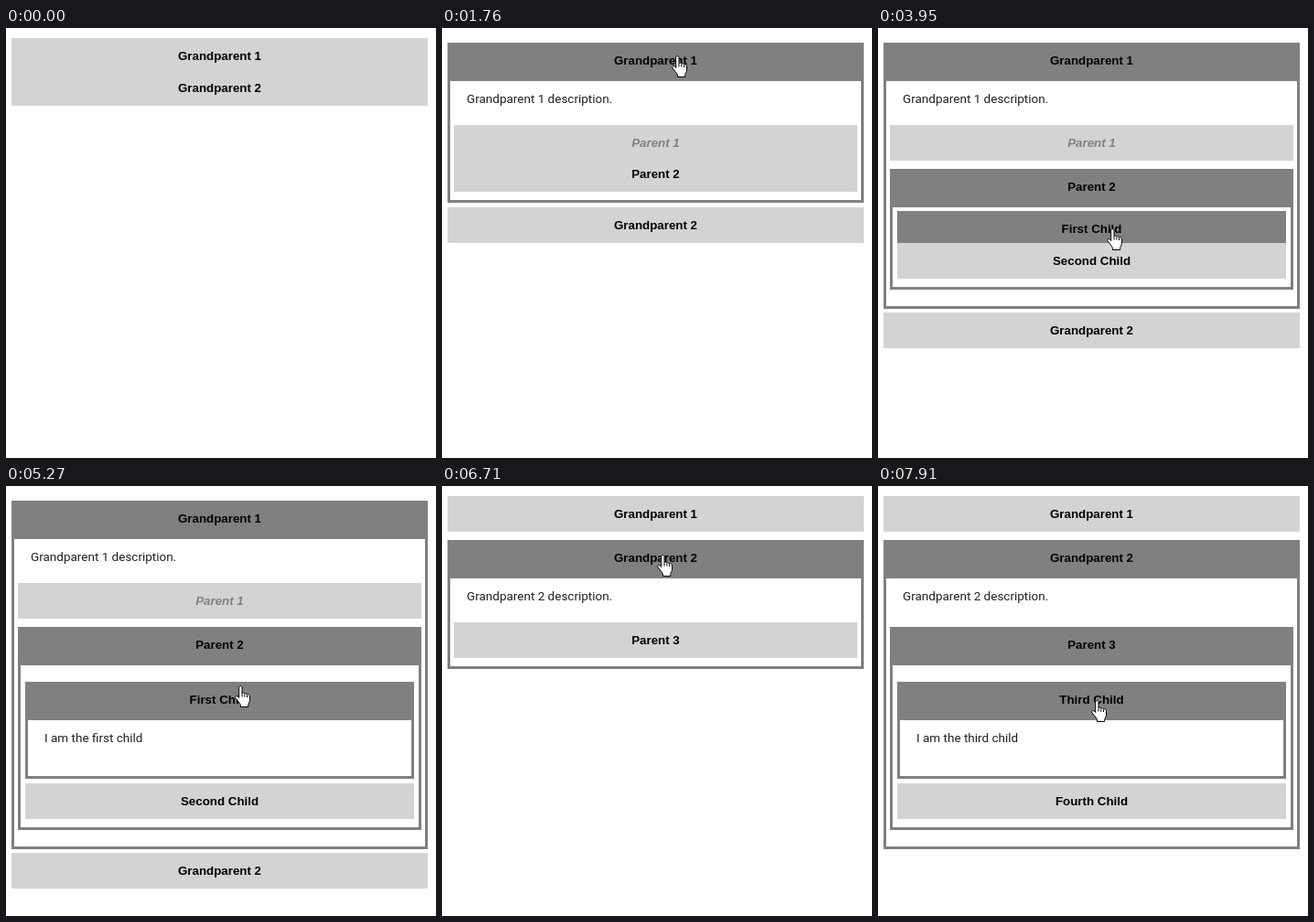
Recreate the animation shown at these times as an HTML page. Size 470 by 470 pixels, loop 8000 ms.

```html
<!DOCTYPE html>
<html lang="en">
<head>
<meta charset="utf-8">
<title>Nested accordion</title>
<style>
  html, body { margin: 0; width: 100%; height: 100%; overflow: hidden; background: #fff; }
  #stage { position: relative; width: 470px; height: 470px; overflow: hidden; }
  #stage div { position: absolute; box-sizing: border-box; }
  .bar {
    height: 39px; background: #d3d3d3; color: #000; text-align: center;
    font: bold 13.333px/39px "Liberation Sans", Arial, sans-serif;
  }
  .bar.dark { background: #808080; }
  .bar.off { color: #808080; font-style: italic; }
  .bar.ring { outline: 2px solid #101010; outline-offset: -1px; }
  .panel { border: 3px solid #808080; background: #fff; }
  .note { color: #212121; font: 13.5px/20px Roboto, sans-serif; white-space: nowrap; }
  svg { position: absolute; left: 0; top: 0; overflow: visible; fill: #fff; stroke: #000; stroke-linejoin: round; }
</style>
</head>
<body>
<div id="stage">
  <div id="view"></div>
  <svg id="arrow" width="13" height="20"><path d="M.5.5v16l3.7-3.5 2.6 5.8 2.4-1-2.5-5.6h5Z"/></svg>
  <svg id="hand" width="17" height="24">
    <path d="M6.3.6c1 0 1.7.7 1.7 1.6v6.3c.4-.7 2.4-.7 2.8.6.7-.6 2.5-.3 2.7.9 1-.5 3 0 3 1.8v4.4c0 2.500-1.800 3.600-1.800 5.300v2H6.500v-1.800C6.500 19.900 1.200 14.800.7 13.300c-.4-1.600 1.500-2.500 3-.9l1 1.100V2.200C4.700 1.300 5.300.6 6.300.6Z"/>
    <path fill="none" d="M8 8.500v4M10.800 9.500v3.200M13.500 10.500v2.500"/>
  </svg>
</div>
<script>
const LOOP = 8000;
const view = document.getElementById('view');
const cursors = { arrow: document.getElementById('arrow'), hand: document.getElementById('hand') };

// Left edge and width of each nesting level
const LEVELS = [[6, 455], [13, 441], [21, 425]];
const G1 = 'Grandparent 1', G2 = 'Grandparent 2';
const P1 = 'Parent 1', P2 = 'Parent 2', P3 = 'Parent 3';
const C1 = 'First Child', C2 = 'Second Child', C3 = 'Third Child', C4 = 'Fourth Child';
const NOTES = {
  [G1]: 'Grandparent 1 description.',
  [G2]: 'Grandparent 2 description.',
  [C1]: 'I am the first child',
  [C3]: 'I am the third child'
};

// Each item: name, level, top, bottom of its panel when open
const SCENES = {
  closed: [[G1, 0, 11], [G2, 0, 46]],
  g1: [[G1, 0, 16, 191], [P1, 1, 106], [P2, 1, 140], [G2, 0, 196]],
  p2: [[G1, 0, 16, 307], [P1, 1, 106], [P2, 1, 154, 286], [C1, 2, 200], [C2, 2, 235], [G2, 0, 311]],
  c1: [[G1, 0, 16, 397], [P1, 1, 106], [P2, 1, 154, 376], [C1, 2, 214, 320], [C2, 2, 325], [G2, 0, 401]],
  g2: [[G1, 0, 11], [G2, 0, 59, 200], [P3, 1, 149]],
  p3: [[G1, 0, 11], [G2, 0, 59, 307], [P3, 1, 154, 286], [C3, 2, 200], [C4, 2, 235]],
  c3: [[G1, 0, 11], [G2, 0, 59, 397], [P3, 1, 154, 376], [C3, 2, 214, 320], [C4, 2, 325]]
};

// Time, scene, hovered item, focus ring, cursor, x, y
const STEPS = [
  [0, 'closed'],
  [550, 'closed', '', '', 'arrow', 459, 176],
  [650, 'closed', '', '', 'arrow', 424, 117],
  [870, 'closed', G2, '', 'hand', 340, 60],
  [990, 'closed', G1, '', 'hand', 280, 30],
  [1110, 'closed', G1, '', 'hand', 244, 18],
  [1540, 'closed', G1, '', 'hand', 250, 18],
  [1760, 'g1', G1, '', 'hand', 251, 30],
  [1980, 'g1', G1, '', 'hand', 250, 33],
  [2200, 'g1', '', G1, 'arrow', 254, 72],
  [2310, 'g1', '', G1, 'arrow', 253, 118],
  [2420, 'g1', P2, G1, 'hand', 246, 156],
  [2750, 'g1', P2, '', 'hand', 246, 156],
  [2850, 'p2', P2, '', 'hand', 246, 156],
  [3180, 'p2', P2, '', 'hand', 245, 164],
  [3280, 'p2', P2, '', 'hand', 246, 172],
  [3530, 'p2', '', P2, 'arrow', 253, 195],
  [3630, 'p2', C1, P2, 'hand', 249, 208],
  [3730, 'p2', C1, P2, 'hand', 250, 219],
  [3950, 'p2', C1, '', 'hand', 250, 219],
  [4070, 'c1', C1, '', 'hand', 250, 219],
  [5270, 'c1', C1, '', 'hand', 250, 218],
  [5380, 'c1', '', C1, 'arrow', 259, 204],
  [5490, 'c1', P2, C1, 'hand', 258, 185],
  [5710, 'c1', '', C1, 'arrow', 254, 130],
  [5820, 'c1', '', C1, 'arrow', 243, 78],
  [5930, 'c1', G1, C1, 'hand', 229, 34],
  [6150, 'closed', G1, '', 'hand', 229, 34],
  [6370, 'closed', G2, G1, 'hand', 233, 60],
  [6590, 'closed', G2, G1, 'hand', 235, 75],
  [6710, 'g2', G2, '', 'hand', 235, 75],
  [6810, 'g2', G2, '', 'hand', 236, 82],
  [7040, 'g2', '', G2, 'arrow', 243, 112],
  [7150, 'g2', P3, G2, 'hand', 238, 162],
  [7260, 'p3', P3, '', 'hand', 238, 162],
  [7480, 'p3', '', P3, 'arrow', 242, 196],
  [7580, 'p3', C3, P3, 'hand', 234, 228],
  [7910, 'c3', C3, '', 'hand', 233, 234]
];

function box(cls, x, y, size, text = '') {
  return `<div class="${cls}" style="left:${x}px;top:${y}px;${size}">${text}</div>`;
}

function item([name, level, top, bottom], hover, ring) {
  const [x, w] = LEVELS[level];
  const dark = bottom || name === hover ? ' dark' : '';
  const off = name === P1 ? ' off' : '';
  const focus = name === ring ? ' ring' : '';
  let html = '';
  if (bottom) html += box('panel', x, top + 39, `width:${w}px;height:${bottom - top - 39}px`);
  html += box('bar' + dark + off + focus, x, top, `width:${w}px`, name);
  if (bottom && NOTES[name]) html += box('note', x + 21, top + 51, '', NOTES[name]);
  return html;
}

let last;
function draw(now) {
  const t = now % LOOP;
  const step = STEPS.findLast(s => s[0] <= t);
  if (step !== last) {
    last = step;
    const [, scene, hover, ring, kind, x, y] = step;
    view.innerHTML = SCENES[scene].map(i => item(i, hover, ring)).join('');
    for (const k in cursors) {
      cursors[k].style.display = k === kind ? 'block' : 'none';
      cursors[k].style.transform = `translate(${x || 0}px, ${y || 0}px)`;
    }
  }
  requestAnimationFrame(draw);
}
draw(0);
</script>
</body>
</html>
```
